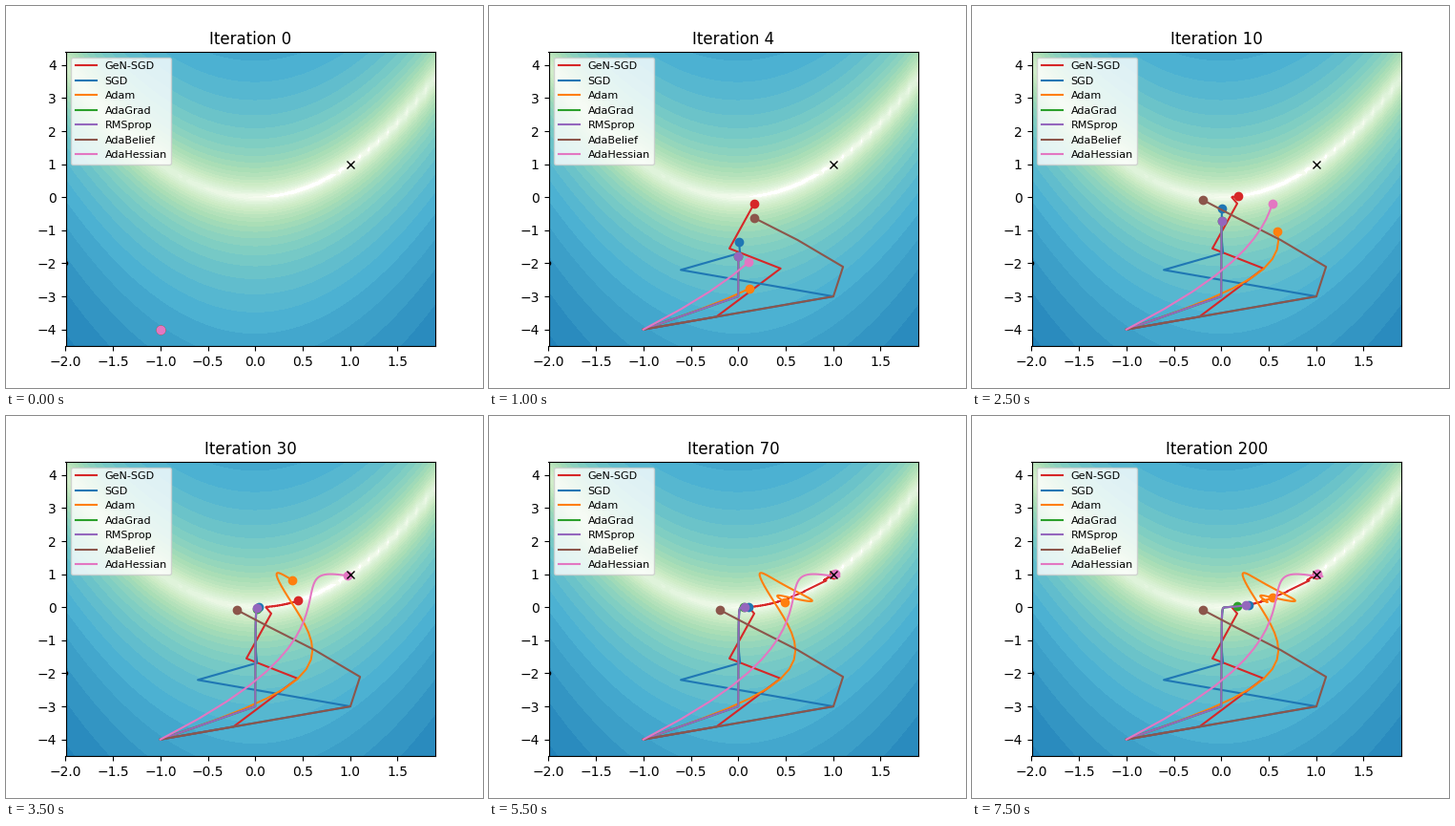
A matplotlib script for the animation above (8 s loop, 500 px wide and 400 px high).

```python
import numpy as np
import matplotlib.pyplot as plt
from matplotlib.animation import FuncAnimation
from matplotlib.colors import LogNorm

START = np.array([-1.0, -4.0])
ITERS = [*range(0, 10, 2), *range(10, 101, 10), 200]
LAST = ITERS[-1]


def rosenbrock(x, y):
    return (1 - x) ** 2 + 100 * (y - x ** 2) ** 2


def grad(p):
    x, y = p
    u = y - x * x
    return np.array([-2 * (1 - x) - 400 * x * u, 200 * u])


def hessian(p):
    x, y = p
    return np.array([[2 - 400 * (y - x * x) + 800 * x * x, -400 * x],
                     [-400 * x, 200]])


def descend(step):
    """Follow step(point, gradient, t, state) from START for LAST iterations."""
    p, path = START, [START]
    state = {"m": np.zeros(2), "v": np.zeros(2)}
    for t in range(1, LAST + 1):
        p = p - step(p, grad(p), t, state)
        path.append(p)
    return np.array(path)


def average(s, key, value, beta, t):
    """Update a running mean in the state; return it with bias corrected."""
    s[key] = beta * s[key] + (1 - beta) * value
    return s[key] / (1 - beta ** t)


def gen_sgd(p, g, t, s):
    # best step size for the local quadratic along the gradient
    return g * (g @ g) / (g @ hessian(p) @ g)


def sgd(p, g, t, s):
    return 0.001 * g


def adam(p, g, t, s, lr=10 ** -0.5):
    m = average(s, "m", g, 0.9, t)
    v = average(s, "v", g * g, 0.999, t)
    return lr * m / (np.sqrt(v) + 1e-8)


def adagrad(p, g, t, s):
    s["v"] = s["v"] + g * g
    return g / (np.sqrt(s["v"]) + 1e-10)


def rmsprop(p, g, t, s, lr=0.1, a=0.99):
    s["v"] = a * s["v"] + (1 - a) * g * g
    return lr * g / (np.sqrt(s["v"]) + 1e-8)


def adabelief(p, g, t, s, lr=0.001, b2=0.999):
    m = average(s, "m", g, 0.9, t)
    v = average(s, "v", (g - s["m"]) ** 2, b2, t)
    top = 2 / (1 - b2) - 1
    rho = top - 2 * t * b2 ** t / (1 - b2 ** t)
    if rho < 5:  # variance not yet reliable: plain momentum
        return lr * m
    rect = (rho - 4) / (top - 4) * (rho - 2) / rho * top / (top - 2)
    return lr * np.sqrt(rect) * m / (np.sqrt(v) + 1e-8)


def adahessian(p, g, t, s, lr=0.006, power=0.43):
    m = average(s, "m", g, 0.9, t)
    v = average(s, "v", np.diag(hessian(p)) ** 2, 0.999, t)
    return lr * m / np.sqrt(v) ** power


RUNS = [
    ("GeN-SGD", "tab:red", gen_sgd),
    ("SGD", "tab:blue", sgd),
    ("Adam", "tab:orange", adam),
    ("AdaGrad", "tab:green", adagrad),
    ("RMSprop", "tab:purple", rmsprop),
    ("AdaBelief", "tab:brown", adabelief),
    ("AdaHessian", "tab:pink", adahessian),
]

fig, ax = plt.subplots(figsize=(5, 4), dpi=100)
xs, ys = np.arange(-2, 2, 0.1), np.arange(-4.5, 4.5, 0.1)
X, Y = np.meshgrid(xs, ys)
ax.contourf(X, Y, rosenbrock(X, Y), levels=np.logspace(0, 5, 35),
            norm=LogNorm(), cmap="GnBu")
ax.plot(-2, -2, "k.")
ax.plot(1, 1, "kx", zorder=3)

artists = []
for name, color, step in RUNS:
    line, = ax.plot([], [], color=color, label=name)
    dot, = ax.plot([], [], "o", color=color)
    artists.append((line, dot, descend(step)))

ax.set_xlim(xs[0], xs[-1])
ax.set_ylim(ys[0], ys[-1])
ax.legend(loc="upper left", fontsize=8)
title = ax.set_title("Iteration 0")


def draw(i):
    n = ITERS[i]
    title.set_text(f"Iteration {n}")
    for line, dot, path in artists:
        line.set_data(*path[:n + 1].T)
        dot.set_data(*path[n:n + 1].T)
    return [title]


anim = FuncAnimation(fig, draw, frames=len(ITERS), interval=500,
                     repeat=True, repeat_delay=0, blit=False)
plt.show()
```
